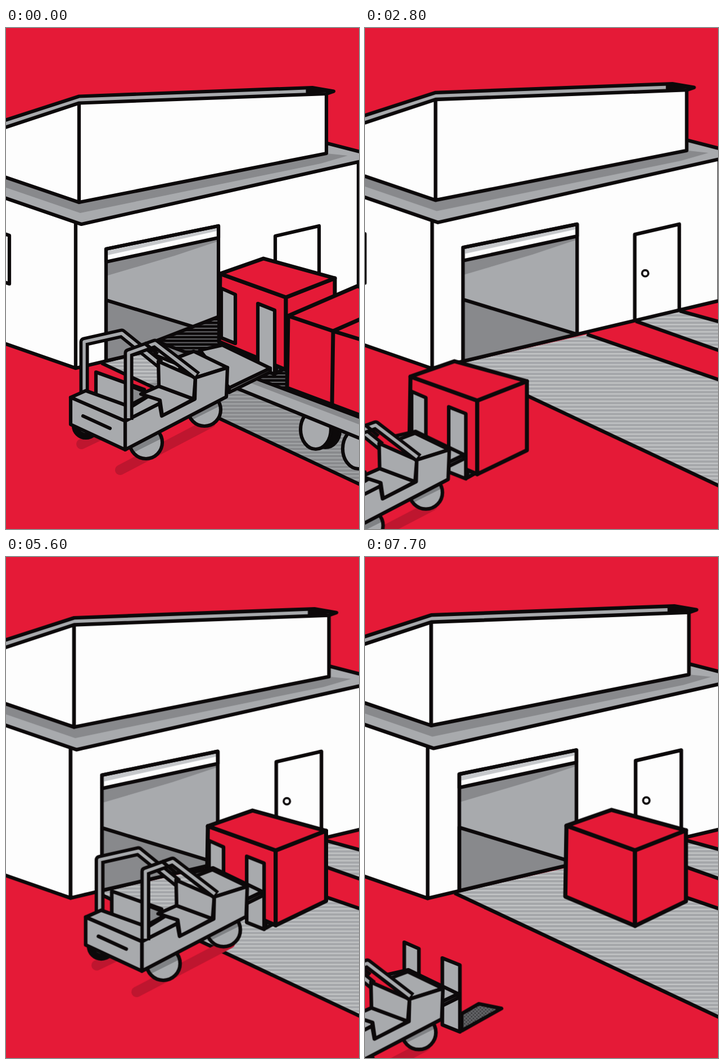
Animation, 628 px wide and 891 px high, one loop 8000 ms. Source, as an HTML page:

```html
<!DOCTYPE html>
<html lang="en">
<head>
<meta charset="utf-8">
<title>Warehouse forklift</title>
<style>
  html, body { margin: 0; width: 100%; height: 100%; overflow: hidden; background: #e51a37; }
  svg { display: block; width: 100%; height: 100%; }

  .ink { stroke: #0c090a; stroke-width: 6.2; stroke-linejoin: round; }
  .bold { stroke-width: 7; }
  .line { fill: none; }
  .white { fill: #fdfdfd; }
  .gray { fill: #a8aaad; }
  .dark { fill: #88898c; }
  .red { fill: #e51a37; }
  .black { fill: #0c090a; }
  .shade { stroke: #be162f; stroke-width: 18; stroke-linecap: round; }
  .tube { fill: none; stroke: #0c090a; stroke-width: 17; }
  .core { fill: none; stroke: #a8aaad; stroke-width: 5.5; }

  /* The scene advances in 700 ms steps: 8.75 % of the loop each. */
  .camera { transform-origin: 422px 557px; animation: camera 8s steps(11) infinite; }
  .truck { animation: truck 8s step-end infinite; }
  .fork { animation: fork 8s step-end infinite; }
  .plate { animation: plate 8s step-end infinite; }
  .cargo { animation: cargo 8s step-end infinite; }
  .wagon { animation: wagon 8s step-end infinite; }

  @keyframes camera {
    0% { transform: scale(1); }
    96.25%, 100% { transform: scale(1.042); }
  }
  @keyframes truck {
    0% { transform: translate(0, 0); }
    26.25% { transform: translate(-139px, 82px); }
    35% { transform: translate(-240px, 143px); }
    43.75% { transform: translate(-145px, 86px); }
    52.5% { transform: translate(35px, -19px); }
    78.75% { transform: translate(6px, -4px); }
    87.5% { transform: translate(-125px, 80px); }
    96.25%, 100% { transform: translate(-244px, 155px); }
  }
  @keyframes cargo {
    0% { transform: translate(55px, -39px); }
    8.75% { transform: translate(38px, -28px); }
    17.5% { transform: translate(21px, -17px); }
    26.25% { transform: translate(-139px, 82px); }
    35% { transform: translate(-240px, 143px); }
    43.75% { transform: translate(-145px, 86px); }
    52.5% { transform: translate(35px, -19px); }
    61.25% { transform: translate(35px, -7px); }
    70%, 100% { transform: translate(35px, 5px); }
  }
  @keyframes fork {
    0% { transform: translate(55px, -39px); }
    8.75% { transform: translate(38px, -28px); }
    17.5% { transform: translate(21px, -17px); }
    26.25% { transform: translate(0, 0); }
    61.25% { transform: translate(0, 12px); }
    70%, 100% { transform: translate(0, 23px); }
  }
  @keyframes plate {
    0% { transform: translate(0, 0); }
    8.75% { transform: translate(-17px, 2px); }
    17.5% { transform: translate(-34px, 4px); }
    26.25%, 100% { transform: translate(-50px, 8px); }
  }
  @keyframes wagon {
    0% { transform: translate(0, 0); }
    26.25% { transform: translate(282px, 94px); }
    35%, 100% { transform: translate(700px, 230px); }
  }
</style>
</head>
<body>
<svg viewBox="0 0 628 891">
  <defs>
    <pattern id="lit" width="8" height="6.4" patternUnits="userSpaceOnUse">
      <path fill="#a4a6a9" d="M0 0H8V7H0Z"/><path fill="#cacccd" d="M0 2H8V4H0Z"/>
    </pattern>
    <pattern id="dim" width="8" height="6.4" patternUnits="userSpaceOnUse">
      <path fill="#88898c" d="M0 0H8V7H0Z"/><path fill="#a7a9ab" d="M0 2H8V4H0Z"/>
    </pattern>
    <pattern id="bed" width="8" height="6.4" patternUnits="userSpaceOnUse">
      <path fill="#0c090a" d="M0 0H8V7H0Z"/><path fill="#77787b" d="M0 2H8V3.6H0Z"/>
    </pattern>
    <pattern id="dots" width="6" height="6" patternUnits="userSpaceOnUse">
      <path fill="#626366" d="M0 0H6V6H0Z"/><path fill="#2a292b" d="M1 1h2v2H1ZM4 4h2v2H4Z"/>
    </pattern>
    <linearGradient id="tire" x1=".3" y1=".1" x2=".7" y2=".9">
      <stop offset=".62" stop-color="#808285"/><stop offset=".62" stop-color="#a8aaad"/>
    </linearGradient>
    <clipPath id="lane"><path d="M170 596 395 545 660 636V826Z"/></clipPath>
  </defs>

  <g class="camera">
    <!-- ground lanes -->
    <g class="ink">
      <path fill="url(#lit)" stroke="none" d="M170 596 395 545 660 636V826Z"/>
      <path fill="url(#lit)" stroke="none" d="M481 522 558 504 660 529V585Z"/>
      <g clip-path="url(#lane)" stroke="none">
        <path class="wagon" fill="url(#dim)" d="M193 640 346 616 660 735V900Z"/>
      </g>
      <path class="line" d="M170 596 660 826M395 545 660 636M481 522 660 585M558 504 660 532"/>
    </g>

    <!-- building -->
    <g class="ink">
      <path class="white" d="M-20 295 124 345V605L-20 555Z"/>
      <path class="white" d="M124 345 627 237V486L124 605Z"/>
      <path class="white" d="M-20 360 6 369V455L-20 446Z"/>
      <path class="gray" d="M-20 258 130 306 571 205 645 224V234L134 349-20 296Z"/>
      <path class="dark" stroke="none" d="M-20 259 130 310 570 223 608 227 560 241 132 329-20 277Z"/>
      <path class="white" d="M-20 182 130 130V310L-20 259Z"/>
      <path class="white" d="M130 130 570 115V223L130 310Z"/>
      <path class="gray" d="M-20 170 130 121.5 545 106 583 112.5 570 117 130 133.5-20 183Z"/>
      <path class="black" stroke-width="3" d="M535 106 583 112 535 115Z"/>
    </g>

    <!-- dock opening and side door -->
    <g class="ink">
      <path class="gray" stroke="none" d="M178 393 378 352V546L178 592Z"/>
      <path class="dark" stroke="none" d="M178 415 378 372V379L300 405 178 441Z"/>
      <path class="dark" d="M178 484 378 545 178 592Z"/>
      <path class="white" d="M178 393 378 352V373L178 416Z"/>
      <path fill="#c6c8cb" stroke="none" d="M181 396 375 356V361L181 404Z"/>
      <path class="line" d="M178 592V393L378 352V546"/>
      <path class="line" d="M479 521V370L557 352V504"/>
      <circle class="white" cx="497.3" cy="438" r="5.5" stroke-width="3.6"/>
    </g>

    <!-- flat wagon -->
    <g class="wagon ink">
      <ellipse class="black" cx="349" cy="622" rx="28" ry="34"/>
      <ellipse class="gray" cx="334" cy="620" rx="27" ry="35"/>
      <ellipse class="black" cx="568" cy="716" rx="26" ry="30"/>
      <ellipse class="gray" cx="551" cy="714" rx="27" ry="35"/>
      <ellipse class="gray" cx="627" cy="748" rx="28" ry="36"/>
      <path fill="url(#bed)" d="M266 557 395 507 780 634V749L266 557Z"/>
      <path class="gray" d="M266 557 780 749V791L266 582Z"/>
      <path class="dark" stroke="none" d="M269 561 780 752V763L269 568Z"/>
    </g>

    <g class="truck">
      <path class="shade" d="M203 786 364 702M134 740 172 722"/>
      <path class="fork ink" fill="url(#dots)" d="M426 653 494 615 455 607 426 624Z"/>
    </g>

    <!-- carried crate -->
    <g class="cargo ink bold red">
      <path d="M326 476 443 518V647L324 597Z"/>
      <path d="M443 518 530 484V605L443 647Z"/>
      <path d="M326 476 403 449 530 484 443 518Z"/>
    </g>

    <!-- crates left on the wagon -->
    <g class="wagon ink bold red">
      <path d="M502 512 625 459 780 510V745L580 670 500 640Z"/>
      <path class="line" d="M502 512 582 539 780 600M582 539 705 485M582 539 580 670"/>
    </g>

    <!-- forklift -->
    <g class="truck ink">
      <g class="fork gray">
        <path d="M328 502 353 513V600L328 590Z"/>
        <path d="M393 529 423 541V655L393 643Z"/>
      </g>
      <g class="plate gray">
        <path d="M397 640 470 605V612L397 648Z"/>
        <path d="M345 573 385 564 470 605 397 640Z"/>
      </g>

      <circle class="black" cx="142" cy="707" r="22"/>
      <path class="gray" stroke="none" d="M128 708 146 720A16 16 0 0 1 128 708Z"/>
      <circle fill="url(#tire)" cx="353" cy="679" r="29"/>
      <circle fill="url(#tire)" cx="249" cy="737" r="29"/>

      <path class="tube" d="M139 652V558L206 543 274 598"/>
      <path class="core" d="M139 652V558L206 543 274 598"/>

      <path class="gray" d="M160 612 246 643 222 656V676L160 654Z"/>
      <path class="dark" d="M222 637 258 651 222 670Z"/>
      <path class="gray" d="M115 657 142 645 222 674 256 653 274 662 273 668 212 699Z"/>
      <path class="gray" d="M240 651 272 637 334 660 278 690 274 662Z"/>
      <path class="gray" d="M271 593 337 622 334 660 272 637Z"/>
      <path class="gray" d="M297 589 334 575 394 604 337 622Z"/>
      <path class="gray" d="M212 699 273 668 277 690 336 660 337 622 394 604 392 656 212 750Z"/>
      <path class="gray" d="M115 657 212 699V750L115 705Z"/>
      <path class="line" stroke-linecap="round" d="M137 690 185 712"/>

      <path class="tube" d="M218 697V578L265 561 340 619"/>
      <path class="core" d="M218 694V578L265 561 338 617"/>
      <path class="line" d="M246 560 270 580"/>
    </g>
  </g>
</svg>
</body>
</html>
```
